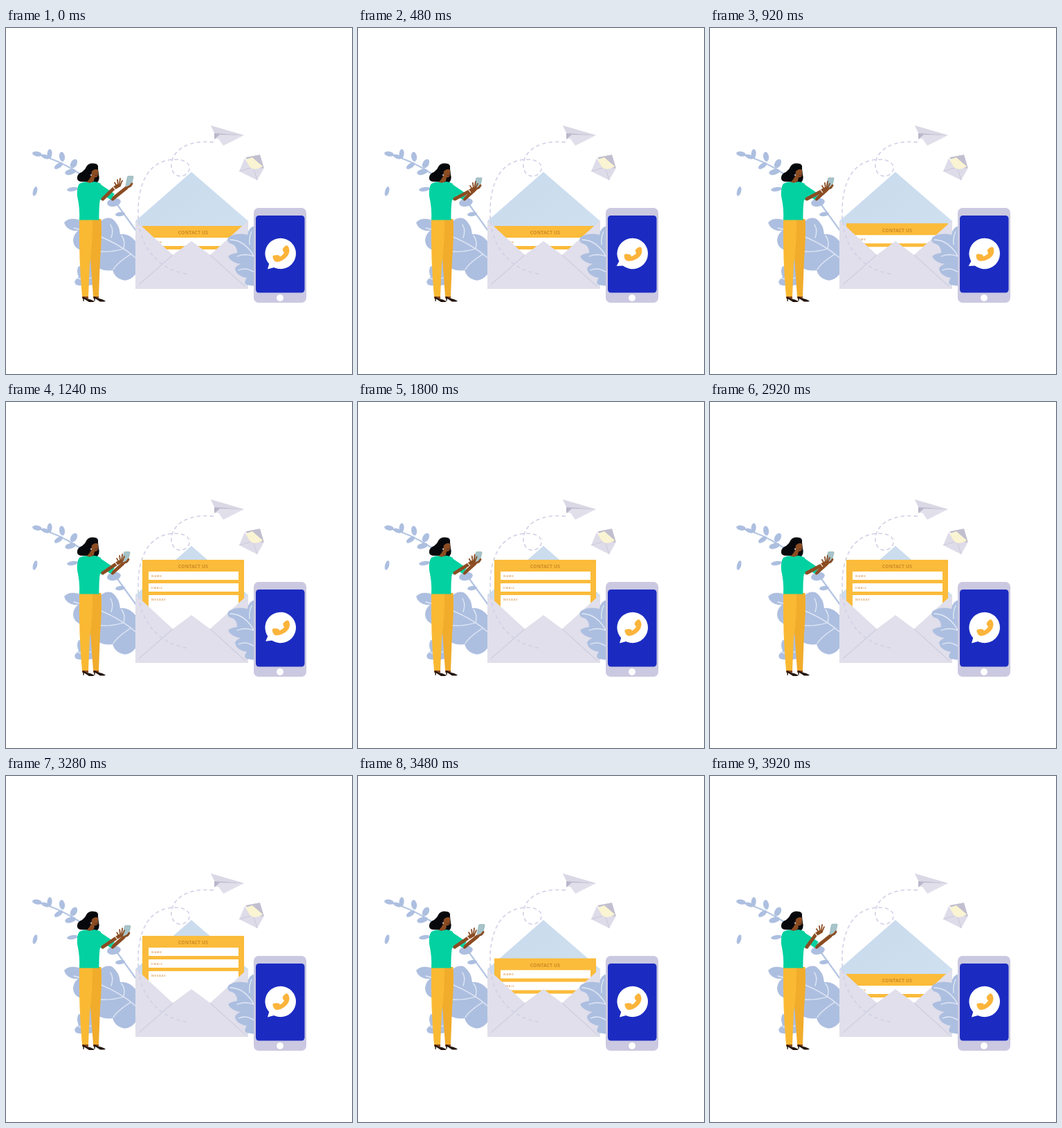
These frames come from a looping animation (500x500 px, 4040 ms). An HTML page:

```html
<!DOCTYPE html>
<html lang="en">
<head>
<meta charset="utf-8">
<title>Contact us</title>
<style>
  html, body { margin: 0; width: 100%; height: 100%; overflow: hidden; background: #fff; }
  svg { display: block; width: 100%; height: 100%; }
  text { font-family: "Open Sans", sans-serif; font-weight: 700; }
  .leaf { fill: #adbfe0; }
  .vein { fill: none; stroke: #e3eaf6; stroke-width: 1.3; stroke-linecap: round; }
  .skin { fill: #8b4c22; }
  .limb { fill: none; stroke: #8b4c22; stroke-linecap: round; stroke-linejoin: round; }
  .shirt { fill: #03d1a1; }
  .sleeve { fill: none; stroke: #03d1a1; stroke-width: 10; stroke-linejoin: round; }
  .label { font-size: 4.1px; letter-spacing: .85px; fill: #dfa565; }
</style>
</head>
<body>
<svg viewBox="0 0 500 500">
  <defs>
    <linearGradient id="inside" x1="0" y1="0" x2="1" y2="1">
      <stop offset="0" stop-color="#c9daec"/>
      <stop offset="1" stop-color="#d0e1f1"/>
    </linearGradient>
    <clipPath id="pocket"><path d="M187 200H350V370H187Z"/></clipPath>
  </defs>

  <!-- branch -->
  <path d="M43 182Q75 190 104 209Q143 232 162 257L188 293" fill="none" stroke="#b4c5e3" stroke-width="2.2"/>
  <g id="twig" class="leaf"></g>

  <!-- left plant -->
  <path class="leaf" d="M84 281Q91 273 105 277L137 279Q146 272 154 276Q164 284 165 298Q177 296 187 308V356
    Q178 367 168 364Q157 361 154 350Q143 352 134 347L126 371Q111 374 101 371Q96 366 105 360
    Q101 351 105 344L112 346V322Q97 319 97 306Q98 298 104 293Q88 294 84 281Z"/>
  <path class="vein" d="M187 332Q154 303 98 289M152 303Q156 292 151 284M170 318Q173 308 167 300
    M170 319Q154 324 137 323M180 327Q160 340 155 349M104 362Q116 364 126 360"/>

  <!-- envelope with form -->
  <path d="M187 279L268 208L350 279L295 332H241Z" fill="url(#inside)"/>
  <g clip-path="url(#pocket)">
    <g id="form">
      <path d="M197 0H344V140H197Z" fill="#fbbb3b"/>
      <path d="M206 17H336V29H206ZM206 34H336V46H206ZM206 51H336V140H206Z" fill="#fff"/>
      <text x="270.5" y="12.4" text-anchor="middle" font-size="6.7" letter-spacing=".2" fill="#cc8a25">CONTACT US</text>
      <text class="label" x="210" y="24.6">NAME</text>
      <text class="label" x="210" y="41.6">EMAIL</text>
      <text class="label" x="210" y="58.6">MESAGE</text>
    </g>
  </g>
  <path d="M187 278L241 328L268 308L295 328L350 278V377H187Z" fill="#e0dfeb"/>
  <path d="M241 328L192 371M295 328L346 374" fill="none" stroke="#d0cfe0" stroke-width="1.3"/>

  <path d="M300 165C270 162 245 171 239 194C237 213 252 219 262 210C270 200 262 190 245 190
    C205 190 190 226 191 270C192 320 224 351 265 356" fill="none" stroke="#d2d0e7" stroke-width="1.6" stroke-dasharray="5.5 4"/>

  <!-- right plant -->
  <path class="leaf" d="M360 286Q350 288 349 299Q334 295 322 302Q318 307 323 311Q334 313 334 325
    Q325 326 321 330Q325 339 339 341Q331 344 331 349Q334 359 348 361Q343 368 347 371L360 373Z"/>
  <path class="vein" d="M324 306Q346 306 360 333M334 330Q346 325 358 330M336 350Q348 345 360 354M352 313Q351 302 355 294"/>

  <!-- paper plane -->
  <path d="M296 141L344 155L314 170L307 160L301 160V152Z" fill="#e0dfea"/>
  <path d="M296 141L344 155L302 152Z" fill="#dad8e5"/>
  <path d="M301 152L344 155L309 154L301 161Z" fill="#b9b7ca"/>

  <!-- small letter -->
  <path d="M346 187L367 183L373 203L360 204Z" fill="#c1bfcf"/>
  <path d="M347 190L356 187L371 200L361 206L350 201Z" fill="#fbf4d3"/>
  <path d="M345 188L353 202L359 204L373 202L363 220L337 207Z" fill="#dedce9"/>
  <path d="M337 207L354 202M363 220L358 204" stroke="#cbc9da" fill="none"/>

  <!-- large phone -->
  <rect x="358" y="260" width="76" height="137" rx="7" fill="#cbc8e1"/>
  <rect x="361" y="271" width="70.5" height="111.5" rx="4.5" fill="#1b2bc1"/>
  <circle cx="396" cy="390" r="5" fill="#fff"/>
  <g id="bubble">
    <circle cx="396.7" cy="326" r="22.3" fill="#fff"/>
    <path d="M381 338L378 348.5L391 345Z" fill="#fff"/>
    <path d="M385.500 331.500Q385 328.500 388 328.500L392.500 328Q395 328 396 330.500Q400 328.500 402 324.500Q398.500 321.500 400.500 318
      L403.500 315Q407 313 408.500 317Q411.500 324 405.500 331Q399 337.500 391.500 338Q387 337.500 385.500 331.500Z" fill="#fbb43b"/>
  </g>

  <!-- woman -->
  <path class="skin" d="M110 385H119V391H110ZM126 385H134V391H126Z"/>
  <path id="shoe" d="M111 388L117 391Q123 392 128 395L126 396H120L113 391.500L112.500 395H111.500Z" fill="#24150e"/>
  <use href="#shoe" x="16" y="-.5"/>
  <path d="M121 276H137.500Q139 299 136 335L134 388H126L121 320Z" fill="#f1ac2c"/>
  <path d="M106 276H125Q125 315 121 340L119 388H110Q105 335 106 276Z" fill="#fab933"/>

  <path id="farArm" class="limb" stroke-width="5"/>
  <path d="M126 225L154 244" class="sleeve"/>
  <g id="handset">
    <path d="M-1.500-8H5Q6.500-8 6-6.500L3 6Q2.500 8 1 8H-3.500Q-5.500 8-5 6L-2.500-7Z" fill="#a6c4c9" stroke="#8dacb2" stroke-width=".7"/>
    <path d="M-4 9L2 6L4 3" class="limb" stroke-width="3"/>
  </g>

  <path d="M117 199Q121 194 129 196Q134 197 133 203L134 212Q136 219 132 223L108 222Q102 221 103 215Q104 210 110 208Q115 204 117 199Z" fill="#07080c"/>
  <path class="skin" d="M124 207Q129 202 133 205V213Q132 216 128 216L127 221L121 225L116 223Q121 219 123 214Z"/>
  <path d="M128.500 213L132 212.500" stroke="#5d2a1c"/>
  <circle cx="123" cy="212.500" r="1" fill="#eef"/>
  <path class="shirt" d="M106 225Q111 222 116 222.500Q121 225 127 222Q132 222 137 225L138 240Q134 250 134.500 277.500H106
    Q107 261 103 243Q102 230 106 225Z"/>
  <path d="M117 229L141 245" class="sleeve"/>
  <path id="nearArm" class="limb" stroke-width="5"/>
  <g id="hand">
    <path class="limb" stroke-width="4.200" d="M-2 3L1 2"/>
    <path class="limb" stroke-width="1.800" d="M-3 3L-6-2M-1 1L-2-6M1 0L2-8M2 2L5-5"/>
    <path d="M-9 3L-5 8" stroke="#f3eee8" stroke-width="1.300"/>
  </g>
</svg>
<script>
const LOOP = 4040, STEP = 40, LAST = 3920;
const $ = id => document.getElementById(id);

// centre x, centre y, half width, half height, tilt
const twigLeaves = [
  [45, 182, 7, 3.5, 10], [57, 186, 6, 3, 20], [63, 182, 3.5, 7, 5], [81, 186, 4, 7, -8],
  [76, 199, 7, 3.5, -35], [98, 196, 4.5, 7, 28], [93, 208, 8, 4, -15], [96, 233, 8, 3, -8],
  [42, 236, 3, 7, 15], [156, 252, 10, 6, -12], [165, 269, 7, 3, -8]
];
$("twig").innerHTML = twigLeaves.map(([x, y, rx, ry, tilt]) =>
  `<ellipse rx="${rx}" ry="${ry}" transform="translate(${x} ${y}) rotate(${tilt})"/>`).join("");

function ease(t, from, to) {
  const p = Math.min(1, Math.max(0, (t - from) / (to - from)));
  return p < .5 ? 2 * p * p : 1 - 2 * (1 - p) ** 2;
}
const move = (id, x, y) => $(id).setAttribute("transform", `translate(${x} ${y})`);

function draw(t) {
  const raised = ease(t, 850, 1240) - ease(t, 3200, 3700);
  move("form", 0, 286 - 58 * raised);

  const ring = t < 2000 ? 13 * Math.sin(t / 400 * 2 * Math.PI) : 0;
  $("bubble").setAttribute("transform", `rotate(${ring} 397 326)`);

  const away = 1 - ease(t, 0, 500) + ease(t, 3120, 3640);
  const px = 173 + 5 * away, py = 224.5 - 2.5 * away;
  move("handset", px, py);
  $("farArm").setAttribute("d", `M154 247L${px - 4} ${py + 9}`);

  const tapping = ease(t, 250, 500) - ease(t, 3100, 3400);
  const tap = tapping * (.5 + .5 * Math.cos((t - 450) / 500 * 2 * Math.PI));
  const spread = .5 * (1 - ease(t, 0, 400)) + ease(t, 3480, 3900);
  const hx = 166 - 6 * spread + 2 * tap, hy = 228 - 5 * spread + 2 * tap;
  move("hand", hx, hy);
  $("nearArm").setAttribute("d", `M140 247L${hx - 7} ${hy + 6}L${hx - 2} ${hy + 3}`);
}

function tick() {
  const t = performance.now() % LOOP;
  draw(Math.min(LAST, Math.floor(t / STEP) * STEP));
  requestAnimationFrame(tick);
}
tick();
</script>
</body>
</html>
```
